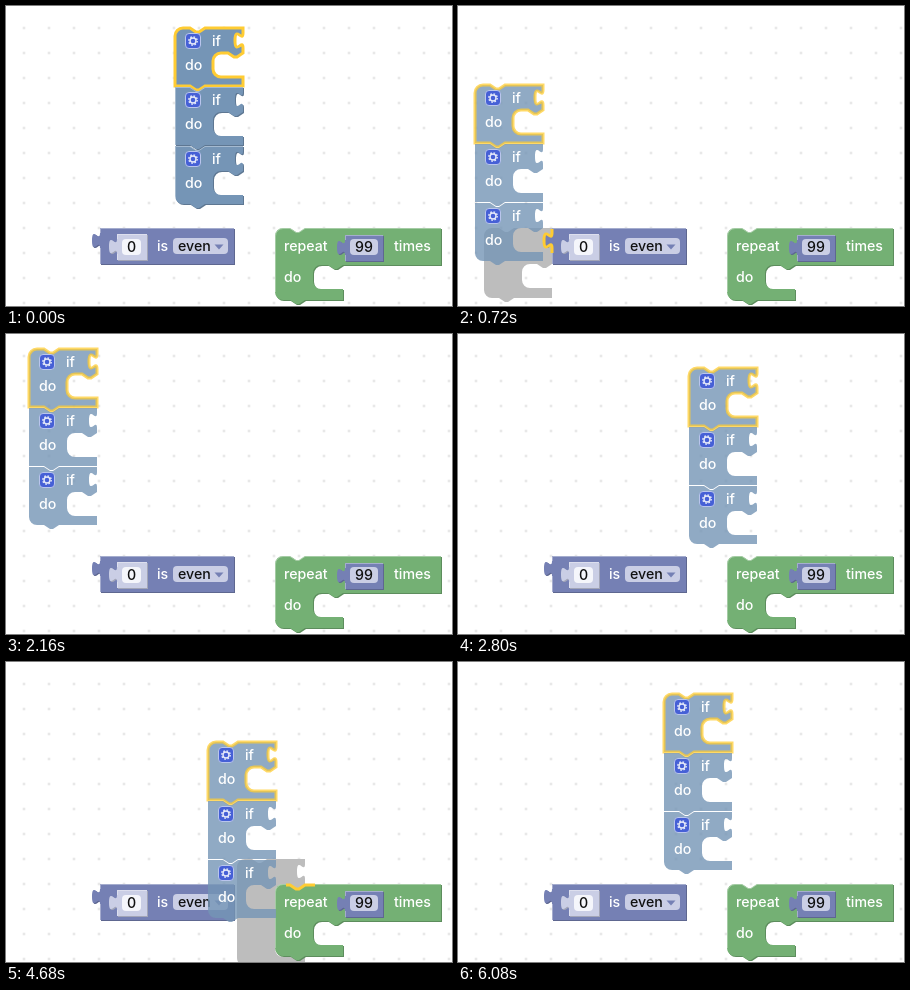
Write an HTML page that moves like this. It is 446 px wide and 300 px high and loops after 6.12 s.

```html
<!DOCTYPE html>
<html lang="en">
<head>
<meta charset="utf-8">
<title>Dragging blocks</title>
<style>
  html, body { margin: 0; width: 100%; height: 100%; overflow: hidden; background: #fff; }
  svg { display: block; width: 446px; height: 300px; }
  text { font: 500 14.2px Inter, "Liberation Sans", sans-serif; fill: #fff; }
  .ink { fill: #111; }
  .light { fill: none; stroke: #fff; stroke-opacity: .35; }
  .outline { fill: none; stroke: #fc3; stroke-width: 3; }
  .dragging .body { fill-opacity: .8; }
  .dragging .outline { stroke-opacity: .75; filter: blur(.6px); }
  .dragging .light, .dragging .dark { display: none; }
</style>
</head>
<body>
<svg viewBox="0 0 446 300">
  <defs>
    <pattern id="grid" x="5.5" y="9.5" width="25" height="25" patternUnits="userSpaceOnUse">
      <rect x="11.6" y="11.6" width="1.8" height="1.8" fill="#d0d0d0"/>
    </pattern>
  </defs>
  <rect width="446" height="300" fill="url(#grid)"/>
  <g id="scene"></g>
</svg>
<script>
const LOOP = 6120, STEP = 40, PITCH = 59, SNAP = 40;
const LOGIC = '#7595b6', MATH = '#7580b4', LOOPS = '#74b074', FIELD = '#cacee5';
const EVEN = { x: 94, y: 222 }, REPEAT = { x: 269, y: 222 };
const SLOT_X = 38, ROW = 25, WIDTH = 68, TAB_Y = 5;
const TAB = 'c0,10 -8,-8 -8,7.5 s8,-2.5 8,7.5';
const NOTCH = 'l6,4 3,0 6,-4', NOTCH_BACK = 'l-6,4 -3,0 -6,-4';

// Block with one input row and one statement slot.
function slotPath({ width = WIDTH, row = ROW, slot = 24, foot = 9, socket = true, top = true, bottom = true }) {
  return (top ? 'M0,8 a8,8 0 0 1 8,-8' : 'M0,0') + `H15 ${NOTCH} H${width}` +
    (socket ? `v${TAB_Y} ${TAB}` : '') + `V${row} H${WIDTH} ${NOTCH_BACK} h-7 a8,8 0 0 0 -8,8 v${slot - 16}` +
    `a8,8 0 0 0 8,8 H${WIDTH} v${foot} H30 ${NOTCH_BACK}` +
    (bottom ? 'H8 a8,8 0 0 1 -8,-8' : 'H0') + 'Z';
}

const valuePath = (w, h) => `M0,0 H${w} V${h} H0 V20 c0,-10 -8,8 -8,-7.5 s8,2.5 8,-7.5 Z`;

const group = ({ x, y }, ...parts) => `<g transform="translate(${x} ${y})">${parts.join('')}</g>`;
const label = (x, y, text, cls = '') => `<text x="${x}" y="${y}" class="${cls}">${text}</text>`;
const field = (x, y, w, fill) => `<rect x="${x}" y="${y}" width="${w}" height="16" rx="4" fill="${fill}"/>`;

// Fill with a darker lower right edge and a lighter upper left edge.
function shape(path, fill, light) {
  const shadow = color => `<path class="dark" d="${path}" transform="translate(1 1)" ${color}/>`;
  return shadow(`fill="${fill}"`) + shadow('fill-opacity=".2"') +
    `<path class="body" d="${path}" fill="${fill}"/><path class="light" d="${light}"/>`;
}

const valueShape = (w, h, fill) => shape(valuePath(w, h), fill, `M.5,${h} V20 M.5,5 V.5 H${w}`);

const gear = group({ x: 10, y: 5 },
  '<rect x=".5" y=".5" width="15" height="15" rx="3.5" fill="#4660d6" stroke="#b9c5ec"/>',
  '<g fill="none" stroke="#e6eafa"><circle cx="8" cy="8" r="4.2" stroke-width="1.4" stroke-dasharray="1.6 1.7"/>',
  '<circle cx="8" cy="8" r="3" stroke-width="1.4"/></g>');

function ifBlock(index) {
  const path = slotPath({ top: index === 0, bottom: index === 2 });
  return group({ x: 0, y: index * PITCH },
    index ? shape(path, LOGIC, `M.5,58 V.5 H15 ${NOTCH} H${WIDTH}`)
          : `<path class="body" d="${path}" fill="${LOGIC}"/><path class="outline" d="${path}"/>`,
    gear, label(37, 18, 'if'), label(10, 42, 'do'));
}

const evenBlock = group(EVEN,
  valueShape(134, 36, MATH),
  group({ x: 17, y: 6 }, valueShape(30, 26, FIELD), field(5, 5, 19, '#f5f6fb'), label(10, 18, '0', 'ink')),
  label(57, 23, 'is'), field(73, 10, 55, FIELD), label(78, 23, 'even', 'ink'),
  `<path d="M114.5,16.5 h9 l-4.5,5 Z" fill="${MATH}"/>`);

const repeatBlock = group(REPEAT,
  shape(slotPath({ width: 166, row: 37, foot: 11, socket: false }), LOOPS,
    `M.5,64 V8 a7.5,7.5 0 0 1 7.5,-7.5 H15 ${NOTCH} H166`),
  label(9, 22.5, 'repeat'),
  group({ x: 70, y: 7 }, valueShape(38, 26, MATH), field(5, 4, 28, FIELD), label(10, 16.8, '99', 'ink')),
  label(119, 22.5, 'times'), label(9, 54, 'do'));

// Preview of where the last block would land, plus the lit connection.
const preview = (id, at, size) => `<g id="${id}">${group(at, `<path d="${slotPath(size)}" fill="#bdbdbd"/>`)}</g>`;
const glow = (id, at, path) => `<g id="${id}">${group(at, `<path class="outline" d="${path}"/>`)}</g>`;

document.getElementById('scene').innerHTML =
  preview('valuePreview', { x: EVEN.x - WIDTH, y: EVEN.y }, { row: 36, foot: 10 }) +
  preview('wrapPreview', { x: REPEAT.x - SLOT_X, y: REPEAT.y - ROW }, { slot: 73 }) +
  evenBlock + repeatBlock +
  glow('valueGlow', EVEN, `M0,1 V${TAB_Y} ${TAB} v5`) +
  glow('wrapGlow', REPEAT, `M11,1 h4 ${NOTCH} h10`) +
  `<g id="stack">${[0, 1, 2].map(ifBlock).join('')}</g>`;

// Pointer path: time, x, y.
const PATH = [
  [0, 169, 22], [640, 14, 66], [720, 17, 79], [1400, 13, 104], [1960, 12, 103], [2160, 23, 15],
  [2560, 80, 0], [2800, 231, 34], [3600, 230, 88], [4680, 202, 80], [5760, 206, 64], [LOOP, 206, 28]
];

function slope(i, axis) {
  const a = PATH[i - 1] || PATH[i], b = PATH[i], c = PATH[i + 1] || b;
  const turns = i > 0 && i < PATH.length - 1 && (b[axis] - a[axis]) * (c[axis] - b[axis]) <= 0;
  return turns || i === 0 ? 0 : (c[axis] - a[axis]) / (c[0] - a[0]);
}

// Smooth curve through the path that comes to rest at each turn.
function position(t, axis) {
  const i = PATH.findIndex(p => t < p[0]) - 1;
  const a = PATH[i], b = PATH[i + 1], span = b[0] - a[0], u = (t - a[0]) / span, v = 1 - u;
  return a[axis] * (1 + 2 * u) * v * v + b[axis] * u * u * (3 - 2 * u) +
    span * u * v * (slope(i, axis) * v - slope(i + 1, axis) * u);
}

const el = id => document.getElementById(id);

function show(name, dx, dy) {
  const display = Math.hypot(dx, dy) < SNAP ? '' : 'none';
  for (const part of ['Preview', 'Glow']) el(name + part).style.display = display;
}

function render(now) {
  const t = Math.floor((now % LOOP) / STEP) * STEP;
  const x = Math.round(position(t, 1)), y = Math.round(position(t, 2));
  const last = y + 2 * PITCH;
  el('stack').setAttribute('transform', `translate(${x} ${y})`);
  el('stack').setAttribute('class', t > 0 ? 'dragging' : '');
  show('value', x + WIDTH - EVEN.x, last - EVEN.y);
  show('wrap', x + SLOT_X - REPEAT.x, last + ROW - REPEAT.y);
}

const start = performance.now();
function tick() {
  render(performance.now() - start);
  requestAnimationFrame(tick);
}
tick();
</script>
</body>
</html>
```
